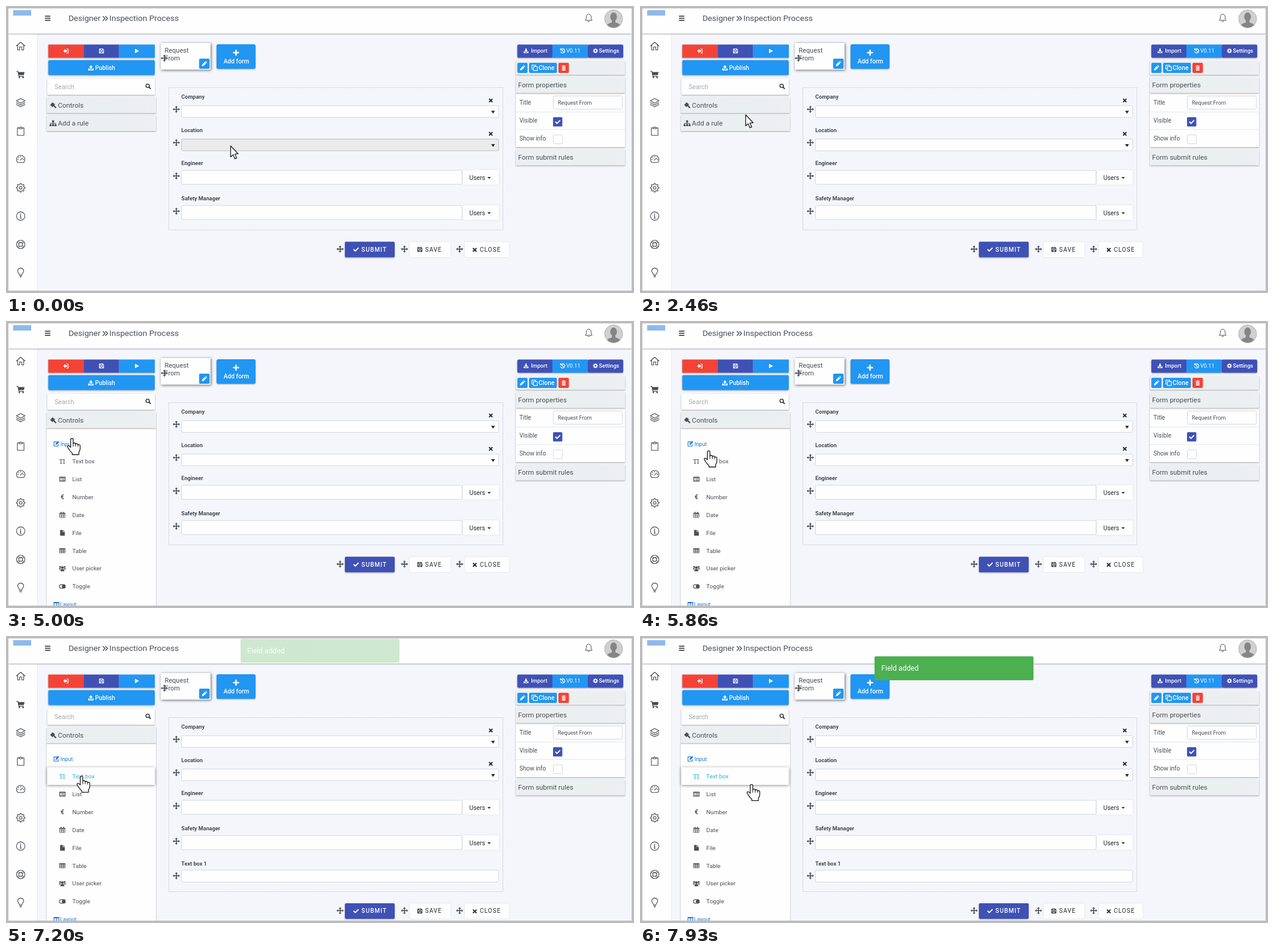
These frames come from a looping animation (1047 px wide and 480 px high, 8000 ms). An HTML page:

```html
<!DOCTYPE html>
<html lang="en">
<head>
<meta charset="utf-8">
<title>Form designer</title>
<style>
  html, body { margin: 0; width: 100%; height: 100%; overflow: hidden; background: #bdbdbd; }
  svg { display: block; width: 1047px; height: 480px; }
  text { font-family: Roboto, "Liberation Sans", sans-serif; white-space: pre; }
  .serif { font-family: "Noto Serif", "Liberation Serif", serif; }
  .sh { filter: drop-shadow(0 1px 1.3px rgba(0,0,0,.34)); }
  .soft { filter: drop-shadow(0 .5px 1px rgba(0,0,0,.13)); }
  .card { filter: drop-shadow(1px 1px 2.2px rgba(0,0,0,.6)); }
  .lift { filter: drop-shadow(0 1.5px 2.5px rgba(0,0,0,.45)); }
  .line { fill: none; stroke: currentColor; stroke-width: 1.1; stroke-linejoin: round; stroke-linecap: round; }
</style>
</head>
<body>
<script>
const RED = '#f44336', INDIGO = '#3f51b5', BLUE = '#2196f3', WHITE = '#fefefe';
const INK = '#4a4f55', DARK = '#24292e', LINK = '#1976d2', CYAN = '#22b4dd';

// Drawing helpers
const rect = (x, y, w, h, fill, more = '') =>
  `<rect x="${x}" y="${y}" width="${w}" height="${h}" fill="${fill}" ${more}/>`;
const text = (x, mid, str, size, fill = INK, more = '') =>
  `<text x="${x}" y="${mid + size * .35}" font-size="${size}" fill="${fill}" ${more}>${str}</text>`;
const path = (d, more = 'fill="currentColor"') => `<path d="${d}" ${more}/>`;
const line = (d, width = 1.1) => `<path class="line" d="${d}" style="stroke-width:${width}"/>`;
const ring = (r, width = 1.1) => `<circle class="line" r="${r}" style="stroke-width:${width}"/>`;
const icon = (name, x, y, color = INK, scale = 1) =>
  `<g transform="translate(${x} ${y}) scale(${scale})" color="${color}">${icons[name]}</g>`;

function gear(inner, outer, teeth) {
  const pts = [];
  for (let i = 0; i < teeth * 4; i++) {
    const a = (i - .5) * Math.PI / teeth / 2, r = i % 4 < 2 ? outer : inner;
    pts.push((r * Math.cos(a)).toFixed(2) + ' ' + (r * Math.sin(a)).toFixed(2));
  }
  return 'M' + pts.join('L') + 'Z';
}
const dot = (x, y, r) => `<circle cx="${x}" cy="${y}" r="${r}" fill="currentColor"/>`;

const icons = {
  move: path('M0-6 2.3-3.4H.8V-.8H3.4V-2.3L6 0 3.4 2.3V.8H.8V3.4H2.3L0 6-2.3 3.4H-.8V.8H-3.4V2.3L-6 0-3.4-2.3V-.8H-.8V-3.4H-2.3Z'),
  pen: path('M-4.2 4.2-3.5 1.1.8-3.2 3.2-.8-1.1 3.5ZM1.4-3.8 2.4-4.7 4.7-2.4 3.8-1.4Z'),
  close: line('M-2.3-2.3 2.3 2.3M2.3-2.3-2.3 2.3', 1.9),
  caret: path('M-3.2-2H3.2L0 2.6Z'),
  smallCaret: path('M-2.8-1.4H2.8L0 1.6Z'),
  check: line('M-3.6 0-1.2 2.5 3.7-2.5', 2),
  plus: line('M-4 0H4M0-4V4', 2.4),
  exit: path('M-4.5 0-1-3.5V-1.2H2V1.2H-1V3.5Z') + line('M1.2-3.3H3.6V3.3H1.2', 1.1),
  play: path('M-3-4 4 0-3 4Z'),
  save: line('M-3.5-3.5H2.2L3.5-2.2V3.5H-3.5ZM-1.8-3.3V-1H1.6V-3.3M-2 3.3V.9H2V3.3', 1.1),
  upload: path('M0-4.5 3.2-1H1.1V1.8H-1.1V-1H-3.2ZM-4.5 1H-2V2.8H2V1H4.5V4.2H-4.5Z'),
  download: path('M0 2.4 3.2-1H1.1V-4.5H-1.1V-1H-3.2ZM-4.5 1H-3L0 3.6 3 1H4.5V4.2H-4.5Z'),
  search: `<circle class="line" cx="-.8" cy="-.8" r="2.9" style="stroke-width:1.4"/>` + line('M1.5 1.5 3.8 3.8', 1.7),
  gavel: path('M-5-.5-1-5 3.4-1.4 2-.2 5.7 3.8 4.2 5.3.4 1.4-.8 3.2Z'),
  tree: path('M-1.7-5H1.7V-1.8H.6V-.6H4.8V1.6H5.8V4.6H2.6V1.6H3.7V.5H.6V1.6H1.7V4.6H-1.7V1.6H-.6V.5H-3.7V1.6H-2.6V4.6H-5.8V1.6H-4.8V-.6H-.6V-1.8H-1.7Z'),
  history: line('M-2.8-2.2A3.6 3.6 0 1 1-3.2 1.6M0-1.8V.4L1.6 1.2M-3.6-3.6V-1.6H-1.6', 1.2),
  cog: path(gear(3, 4.3, 8) + 'M1.4 0A1.4 1.4 0 1 0-1.4 0A1.4 1.4 0 1 0 1.4 0Z', 'fill="currentColor" fill-rule="evenodd"'),
  clone: line('M-2-2H4.6V4.4H-2ZM-2 2H-4.6V-4.4H2V-2', 1.1),
  trash: path('M-3.4-3.4H-1.3V-4.4H1.3V-3.4H3.4V-2.3H-3.4ZM-2.8-1.7H2.8V4.3H-2.8Z') + path('M-1.2-.6V3.2M1.2-.6V3.2', `stroke="${RED}" stroke-width=".8"`),
  edit: line('M1.4-3.2H-4V4H3.2V1', 1.1) + path('M-1.6 1.8-1.2-.3 3-4.5 4.7-2.8.5 1.4Z'),
  columns: line('M-4-3.5H4V3.5H-4ZM0-3.5V3.5M-4-2.6H4', 1.2),
  home: line('M-7.2 0 0-6.5 7.2 0M-5-1.5V6.5H-1.8V1.5H1.8V6.5H5V-1.5'),
  cart: path('M-7-5.6H-4.2L-3.8-4H6.5L5.2 1.2H-2.6L-2.3 2.5H5V3.7H-3.4L-5.2-4.5H-7Z') + dot(-2.2, 5, 1.3) + dot(4, 5, 1.3),
  layers: line('M0-7 7.2-3.2 0 .6-7.2-3.2ZM-7.2 0 0 3.8 7.2 0M-7.2 3 0 6.8 7.2 3'),
  clipboard: line('M-2.5-5.3H-5.5V7H5.5V-5.3H2.5M-2.5-4H2.5V-6H1.2A1.3 1.3 0 0 0-1.2-6H-2.5Z'),
  gauge: line('M-4.8 5.2A7 7 0 1 1 4.8 5.2ZM-.6 1.2 3.4-2.4M-5 0H-4M0-5V-4M4 0H5M-3.6-3.4-3-2.8'),
  settings: line(gear(5.4, 7.2, 8)) + ring(2.3),
  info: ring(7) + line('M-1-.8H0V3.6M-1.2 3.6H1.2') + dot(0, -3.2, .9),
  buoy: ring(7) + ring(3.2) + line('M-5.7-4-2.8-1.4M-4-5.7-1.4-2.8M5.7-4 2.8-1.4M4-5.7 1.4-2.8M-5.7 4-2.8 1.4M-4 5.7-1.4 2.8M5.7 4 2.8 1.4M4 5.7 1.4 2.8', .9),
  bulb: line('M-2 3.5C-2 1-5-.4-5-3.2A5 4.6 0 0 1 5-3.2C5-.4 2 1 2 3.5ZM-1.8 5.3H1.8M-1 7H1'),
  bell: line('M-5.5 3.7C-3.8 2-4 0-4-2A4 4.3 0 0 1 4-2C4 0 3.8 2 5.5 3.7ZM-1.4 5.3A1.5 1.4 0 0 0 1.4 5.3', 1),
  menu: line('M-4-3.4H4M-4 0H4M-4 3.4H4', 1.5),
  chevrons: line('M-3.4-3.4 0 0-3.4 3.4M.8-3.4 4.2 0 .8 3.4', 1.4),
  textbox: '<text class="serif" x="-5.6" y="4" font-size="10.5" fill="currentColor">TI</text>',
  list: line('M-4.6-3.4H4.6V3.4H-4.6ZM-4.6-2.6H4.6M-3-.5H-2.6M-3 1.7H-2.6M-1-.5H3M-1 1.7H3', 1.1),
  euro: '<text x="-3" y="3.8" font-size="10.5" font-weight="700" fill="currentColor">€</text>',
  calendar: line('M-4.2-3.2H4.2V4.4H-4.2ZM-4.2-1.2H4.2M-4.2 1.6H4.2M-1.5-1V4M1.5-1V4', .8) + line('M-4-2.4H4M-2-4.6V-3M2-4.6V-3', 1.4),
  file: path('M-3.8-4.8H.6V-1.2H4V4.8H-3.8ZM1.4-4.8 4-2H1.4Z'),
  table: line('M-4.4-3.6H4.4V3.6H-4.4ZM-4.4-1H4.4M-4.4 1.3H4.4M-1.5-3V3.4M1.5-3V3.4', .9) + line('M-4.3-3H4.3', 1.3),
  users: dot(0, -1.6, 2.2) + dot(-3.8, -2.7, 1.5) + dot(3.8, -2.7, 1.5) + path('M-3.4 4.6Q-3.6.8 0 .8T3.4 4.6ZM-6 1.2Q-6-1-3.4-.8L-2.4.4-3.6 1.4ZM6 1.2Q6-1 3.4-.8L2.4.4 3.6 1.4Z'),
  toggle: line('M-2-3H2A3 3 0 0 1 2 3H-2A3 3 0 0 1-2-3Z', 1.1) + dot(2, 0, 2.9)
};

const button = (x, y, w, h, fill, cls = 'sh') => rect(x, y, w, h, fill, `rx="2" class="${cls}"`);
const bar = (x, y, w, h) => rect(x, y, w, h, 'url(#bar)', 'class="sh"');
const field = (x, y, w, h, more = '') => rect(x, y, w, h, WHITE, `rx="2" stroke="#d3d8df" ${more}`);
const label = (y, str) => text(292.3, y, str, 9.15, '#454a50', 'font-weight="700"');

function header() {
  return rect(4, 4, 1039, 42, WHITE, 'class="sh"') +
    rect(12, 7, 30, 9, '#8db9ee') +
    icon('menu', 69.5, 20.5, DARK) +
    text(104.2, 20.3, 'Designer', 13.6) + icon('chevrons', 165.2, 20.8) +
    text(172.2, 20.3, 'Inspection Process', 13.6) +
    icon('bell', 971.5, 20) +
    `<g clip-path="url(#face)"><circle cx="1013" cy="21.5" r="15.3" fill="#d0d0d0"/>
      <ellipse cx="1013" cy="18" rx="5.6" ry="7.2" fill="#858585"/>
      <path d="M1000 37Q1001 29 1010 27.5V23H1016V27.5Q1025 29 1026 37Z" fill="#858585"/></g>
      <circle cx="1013" cy="21.5" r="15" fill="none" stroke="#b4b4b4"/>`;
}

function sidebar() {
  const names = ['home', 'cart', 'layers', 'clipboard', 'gauge', 'settings', 'info', 'buoy', 'bulb'];
  return rect(4, 46, 48.5, 430, WHITE) + rect(52, 47, 1, 429, '#e6e9ef') +
    names.map((n, i) => icon(n, 24.5, 67 + i * 47.4, '#444a50')).join('');
}

function tools() {
  return `<g class="sh">${rect(70.5, 64.5, 59, 22, RED)}${rect(129.5, 64.5, 59, 22, INDIGO)}${rect(188.5, 64.5, 59.5, 22, BLUE)}</g>` +
    icon('exit', 100, 75.3, WHITE) + icon('save', 159.2, 75.3, WHITE) + icon('play', 218, 75.3, WHITE, .95) +
    button(70.5, 90.5, 177.5, 25, BLUE) + icon('upload', 141.5, 103.5, WHITE) +
    text(148.5, 103.5, 'Publish', 10, WHITE, 'font-weight="500"') +
    rect(69, 122, 179, 26.5, WHITE, 'class="sh"') + text(81, 135.3, 'Search', 10.6, '#a4a9ae') +
    icon('search', 237, 134.3, DARK);
}

const items = [['textbox', 'Text box'], ['list', 'List'], ['euro', 'Number'], ['calendar', 'Date'],
  ['file', 'File'], ['table', 'Table'], ['users', 'User picker'], ['toggle', 'Toggle']];

function controls() {
  const rows = items.map(([name, str], i) => {
    const y = 234.6 + i * 29.9;
    const hover = i ? '' : rect(68.5, 219.5, 179.5, 29.5, WHITE, 'id="lift" class="lift"');
    return hover + `<g id="row${i}" color="${INK}">${icon(name, 94, y, 'currentColor')}${text(110.6, y, str, 9.8, 'currentColor')}</g>`;
  }).join('');
  return `<g id="rule">${bar(68, 183, 182, 26)}${icon('tree', 78.5, 196.3)}${text(86.6, 196.3, 'Add a rule', 11.4)}</g>` +
    `<g clip-path="url(#reveal)">${rect(68, 178, 182, 300, WHITE, 'class="sh"')}` +
    icon('edit', 84, 205.3, LINK) + text(90.7, 205.3, 'Input', 9.2, LINK) + rows +
    icon('columns', 84, 474, LINK) + text(90, 474, 'Layout', 9.2, LINK) + '</g>' +
    bar(68, 153, 182, 26) + icon('gavel', 78.5, 166) + text(86.6, 166, 'Controls', 11.4);
}

function formTabs() {
  return rect(258, 62, 83, 44.5, WHITE, 'class="card"') +
    text(264.5, 74.5, 'Request', 11) + text(264.5, 86.7, 'From', 11) + icon('move', 264, 87.2) +
    button(322, 88, 17.5, 17, BLUE, '') + icon('pen', 330.7, 96.6, WHITE) +
    rect(351, 64, 65, 41, BLUE, 'rx="3" class="sh"') + icon('plus', 383.5, 78, WHITE) +
    text(362.8, 92.4, 'Add form', 10.2, WHITE, 'font-weight="500"');
}

function form() {
  const select = (y, str, id) => label(y, str) + icon('close', 808.2, y + 6, DARK) + icon('move', 284, y + 20.7) +
    field(292.5, y + 14.7, 529, 19.6, `id="${id}"`) + icon('caret', 812, y + 25.3, DARK);
  const user = (y, str) => label(y, str) + icon('move', 284, y + 21) +
    field(292.5, y + 11.5, 468, 23.5) + rect(761, y + 11, 60.5, 24.5, WHITE, 'rx="1" class="soft"') +
    text(772.6, y + 24, 'Users', 10.3, DARK) + icon('smallCaret', 805.5, y + 24.3, DARK);
  return '<rect id="frame" x="271.5" y="136.5" width="557" height="238" fill="none" stroke="#c4cad6" stroke-dasharray="2 1.2"/>' +
    select(152, 'Company', 'company') + select(207.8, 'Location', 'location') +
    user(263.2, 'Engineer') + user(322.2, 'Safety Manager') +
    `<g id="added">${label(380.6, 'Text box 1')}${icon('move', 284, 401)}${field(292.5, 391.5, 529, 20)}</g>` +
    '<g id="actions">' + icon('move', 557, 406.6) + button(565, 394.3, 83, 26, INDIGO) + icon('check', 583.5, 407.4, WHITE) +
    text(592.6, 407.3, 'SUBMIT', 10, WHITE, 'letter-spacing="1" font-weight="500"') +
    icon('move', 664.3, 406.6) + button(673, 394.5, 68, 25.5, WHITE, 'soft') + icon('save', 690, 407.3, DARK) +
    text(698.7, 407.3, 'SAVE', 10, DARK, 'letter-spacing="1"') +
    icon('move', 756.3, 406.6) + button(765, 394.5, 73.5, 25.5, WHITE, 'soft') + icon('close', 781.5, 407.8, DARK, 1.05) +
    text(790, 407.3, 'CLOSE', 10, DARK, 'letter-spacing="1"') + '</g>';
}

function properties() {
  return `<g class="sh">${rect(852.5, 64.5, 59, 22, INDIGO, 'rx="2"')}${rect(970, 64.5, 59, 22, INDIGO, 'rx="2"')}${rect(911, 64.5, 59, 22, BLUE)}</g>` +
    icon('download', 867, 75, WHITE, .9) + text(875.2, 75.3, 'Import', 9.1, WHITE, 'font-weight="500"') +
    icon('history', 928, 75, WHITE) + text(934, 75.3, 'V0.11', 9.1, WHITE) +
    icon('cog', 982.7, 75, WHITE) + text(988.6, 75.3, 'Settings', 9.1, WHITE, 'font-weight="500"') +
    bar(850, 92, 182, 23) + button(852.5, 95, 17, 17, BLUE, '') + icon('pen', 861, 103.6, WHITE) +
    button(872, 95, 46.5, 17, BLUE, '') + icon('clone', 881.3, 103.5, WHITE) + text(888, 103.6, 'Clone', 10.3, WHITE, 'font-weight="500"') +
    button(921, 95, 17.5, 17, RED, '') + icon('trash', 929.8, 103.6, WHITE) +
    rect(850, 146, 182, 90, WHITE, 'class="sh"') + bar(850, 119, 182, 26.5) +
    text(853.8, 132.5, 'Form properties', 11.4) +
    rect(850, 176.8, 182, 1, '#e2e8f1') + rect(850, 206.2, 182, 1, '#e2e8f1') +
    text(856, 161, 'Title', 10) + field(912.5, 150.5, 115, 22) + text(920, 161.7, 'Request From', 9.15) +
    text(856, 191.5, 'Visible', 10) + rect(912, 186, 15.5, 15.5, INDIGO, 'rx="1.5"') + icon('check', 919.8, 194, WHITE, .95) +
    text(856, 221.5, 'Show info', 10) + field(912.5, 215.5, 15, 15) +
    bar(850, 240, 182, 26.5) + text(853.8, 253.3, 'Form submit rules', 11.4);
}

const ARROW = 'M.5 0V18.4L4.6 14.8 7.6 21.6 10.6 20.3 7.6 13.6 13 13.2Z';
const HAND = 'M-2.2 2Q-2.2.4 0 .4 2 .4 2 2.2V9.2Q2.5 7.7 4.2 7.9 6 8.1 6 10 7 8.7 8.6 9.1 10 9.5 10 11.2 11 10.2 12.4 10.7 13.8 11.3 13.6 13V17.4Q13.5 20.4 11.5 23.2V27.4H.4V25Q-3 22-5 18.6L-7.3 15Q-8 13-6.2 12.5-4.5 12.2-2.2 15.2Z';
const outline = `fill="#fff" stroke="#1c1c1c" stroke-width="1.3" stroke-linejoin="round"`;

document.body.innerHTML = `<svg viewBox="0 0 1047 480" xmlns="http://www.w3.org/2000/svg">
  <defs>
    <linearGradient id="bar"><stop stop-color="#eceff1"/><stop offset=".55" stop-color="#eaefef"/><stop offset="1" stop-color="#edeff2"/></linearGradient>
    <clipPath id="stage"><rect x="4" y="4" width="1039" height="472"/></clipPath>
    <clipPath id="reveal"><rect id="open" x="64" y="179" width="190" height="0"/></clipPath>
    <clipPath id="face"><circle cx="1013" cy="21.5" r="15.3"/></clipPath>
  </defs>
  ${rect(0, 0, 1047, 480, '#bdbdbd')}
  <g clip-path="url(#stage)">
    ${rect(4, 4, 1039, 472, '#f4f6fb')}
    ${sidebar()}${header()}${tools()}${controls()}${formTabs()}${form()}${properties()}
    <g id="toast">${rect(391, 34, 265, 40, '#4caf50', 'rx="2"')}${text(402.3, 54, 'Field added', 12.1, '#fff')}</g>
  </g>
  <g id="cursor">${path(ARROW, `id="arrow" ${outline}`)}
    <g id="hand">${path(HAND, outline)}<path d="M2 9V14M6 10V14M10 11.2V14.4" fill="none" stroke="#1c1c1c" stroke-width="1"/></g></g>
</svg>`;

const $ = id => document.getElementById(id);
const show = (id, on) => $(id).setAttribute('visibility', on ? 'visible' : 'hidden');
const shift = (id, x, y) => $(id).setAttribute('transform', `translate(${x} ${y})`);

const LOOP = 8000, TICK = 1000 / 15;
// Cursor moves: start tick, end tick, from, to, ease-out power
const moves = [
  [23, 46, [374, 234], [124, 168.5], 1.68],
  [61, 79, [124, 168.5], [106, 204], 1],
  [82, 96, [106, 204], [126, 234], 1],
  [115, 119, [126, 234], [186, 248], 1]
];

function cursorAt(k) {
  const [a, b, from, to, power] = moves.filter(m => k >= m[0]).pop() || moves[0];
  const u = Math.min(1, Math.max(0, (k - a) / (b - a)));
  const e = 1 - (1 - u) ** power;
  return from.map((v, i) => v + (to[i] - v) * e);
}

function draw(time) {
  const k = Math.floor((Math.floor(time / 10) * 10 + 9.9) / TICK);
  const [x, y] = cursorAt(k);
  const onField = k < 46 && x > 292 && y > 222;
  const onControls = x < 250 && y < 179;
  const hand = k > 0 && (onField || onControls || k > 46);
  shift('cursor', x, y);
  show('hand', hand);
  show('arrow', !hand);
  $('location').setAttribute('fill', onField ? '#ebebeb' : WHITE);
  $('location').setAttribute('stroke', onField ? '#bfbfbf' : '#d3d8df');

  const height = k < 55 ? 0 : [60, 200][k - 55] || 300;
  $('open').setAttribute('height', height);
  shift('rule', 0, height);

  const hover = k > 82 && y > 219;
  show('lift', hover);
  $('row0').setAttribute('color', hover ? CYAN : INK);

  const added = k >= 108;
  show('added', added);
  $('frame').setAttribute('height', added ? 291 : 238);
  shift('actions', 0, added ? 52.7 : 0);

  const p = added ? Math.min(1, .27 + .73 * (k - 108) / 4) : 0;
  $('toast').setAttribute('opacity', p);
  shift('toast', 0, 40 * (p - 1));
}

function loop() {
  draw(performance.now() % LOOP);
  requestAnimationFrame(loop);
}
loop();
</script>
</body>
</html>
```
